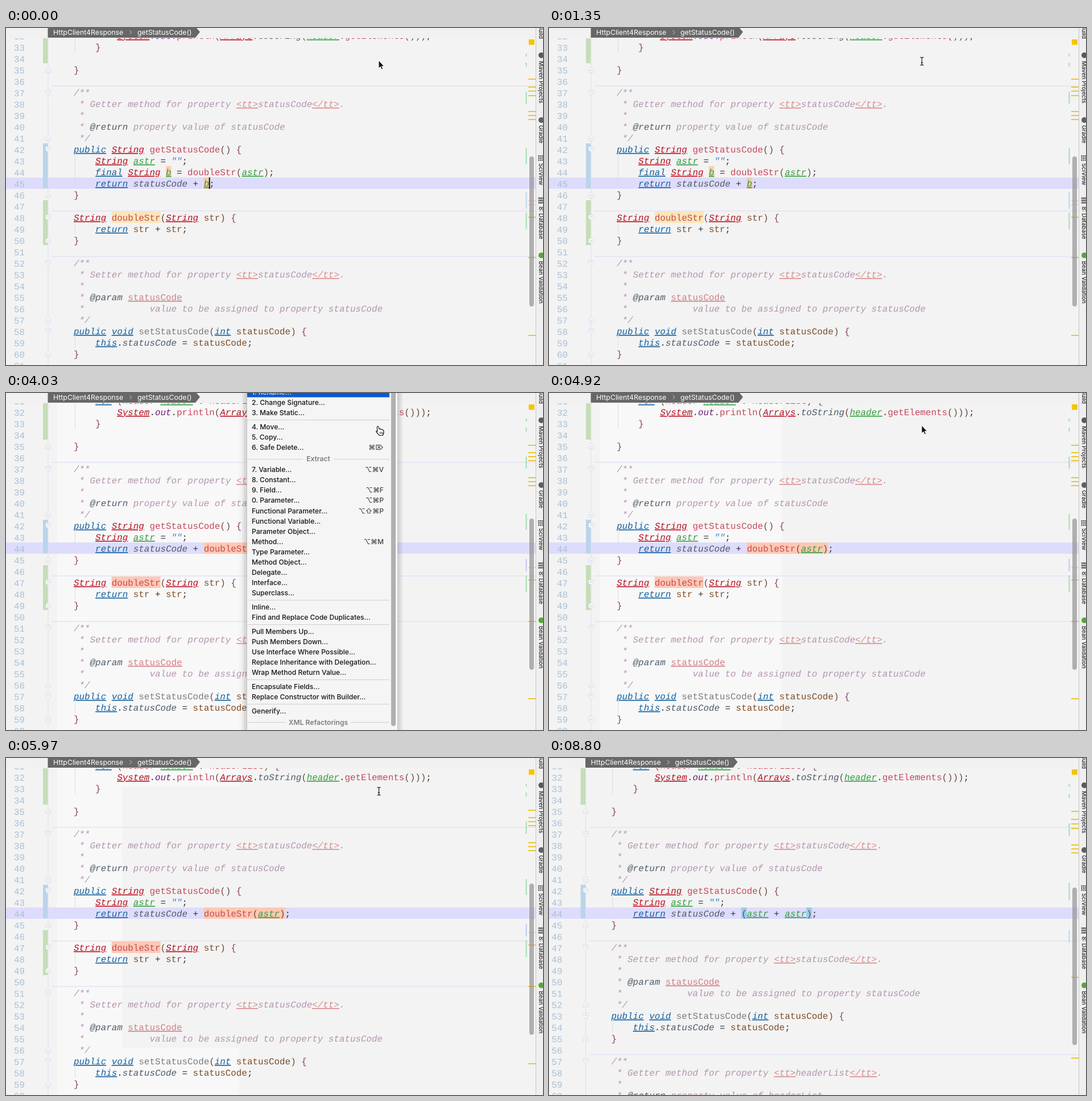
These frames come from a looping animation (944 by 593 pixels, 8.9 s). An HTML page:

```html
<!DOCTYPE html>
<html lang="en">
<head>
<meta charset="utf-8">
<title>Inline refactoring</title>
<style>
html, body { margin: 0; width: 100%; height: 100%; overflow: hidden; background: #f3f3f3; }
svg { display: block; width: 944px; height: 593px; }
text { white-space: pre; font: 500 12.1px Inter, "DejaVu Sans", sans-serif; fill: #151515; }
.code, .num { font: 15.88px "Liberation Mono", "Noto Sans Mono", monospace; text-rendering: geometricPrecision; fill: #333; }
.num { fill: #a9c0d6; }
.k, .t, .v, .tag { font-style: italic; }
.k, .t, .v, .tag, .par { text-decoration: underline 1.3px; text-decoration-skip-ink: none; }
.k { fill: #125f9f; }
.t { fill: #b80f1f; }
.v { fill: #2f9f3e; }
.m { fill: #c4485c; }
.g { fill: #7b7b7b; }
.p { fill: #7c4d28; }
.f { fill: #4e5a68; font-style: italic; }
.o { fill: #6b1d72; font-style: italic; }
.s { fill: #4a82c4; font-style: italic; }
.br { fill: #8a3f5c; }
.pa { fill: #6b4a3c; }
.c { fill: #b294ae; font-style: italic; }
.tag { fill: #d98a8c; }
.par { fill: #d07f86; }
.crumb { font-size: 12.3px; font-weight: 400; fill: #fff; }
.side { font-size: 10.1px; fill: #2a2a2a; }
.head { font-weight: 600; fill: #7c7c7c; text-anchor: middle; }
.mid { text-anchor: middle; }
.end { text-anchor: end; fill: #444; }
.on { fill: #fff; }
</style>
</head>
<body>
<svg id="stage" viewBox="0 0 944 593"></svg>
<script>
const LOOP = 8900, CW = 9.53, X0 = 119, ROW = 20;
const stage = document.getElementById('stage');
const timed = [];

function el(tag, attrs, parent, text) {
  const e = document.createElementNS('http://www.w3.org/2000/svg', tag);
  for (const k in attrs) e.setAttribute(k, attrs[k]);
  if (text !== undefined) e.textContent = text;
  return parent.appendChild(e);
}
const group = (parent, transform = '') => el('g', { transform }, parent);
const rect = (p, x, y, width, height, fill, rx = 0) => el('rect', { x, y, width, height, fill, rx }, p);
const label = (p, x, y, text, cls = '') => el('text', { x, y, class: cls }, p, text);
const path = (p, d, fill, stroke = 'none', w = 1) =>
  el('path', { d, fill, stroke, 'stroke-width': w, 'stroke-linejoin': 'round' }, p);

// Visible only during the given [from, to) spans.
function during(e, ...spans) {
  timed.push({ e, spans });
  return e;
}

// ---------- code ----------
const words = {};
const kinds = {
  k: 'public return final int void this for', t: 'String System Arrays',
  v: 'astr b header', m: 'getStatusCode doubleStr println getElements Header headerList',
  g: 'setStatusCode', p: 'str statusCode', f: 'toString', o: 'out'
};
for (const c in kinds) kinds[c].split(' ').forEach(w => words[w] = c);

function kind(tok, before) {
  if (tok === 'statusCode' && /(this\.|return )$/.test(before)) return 'f';
  if (tok === '""') return 's';
  if (/[{}]/.test(tok)) return 'br';
  if (/[()]/.test(tok)) return 'pa';
  return words[tok] || '';
}
function docKind(tok, before) {
  if (/^</.test(tok)) return 'tag';
  if (/^@/.test(tok)) return 'f';
  return /@param $/.test(before) ? 'par' : 'c';
}
function codeLine(p, y, line) {
  const doc = /^(\/\*| \*)/.test(line);
  const t = el('text', { x: X0, y, class: 'code' }, p);
  const toks = line.match(doc ? /<\/?tt>|@\w+|\w+|\s+|[^\w\s]/g : /""|\w+|\s+|[^\w\s]/g) || [];
  let before = '';
  for (let i = 0; i < toks.length; i++) {
    const tok = toks[i];
    let cls = (doc ? docKind : kind)(tok, before);
    if (cls === 'par' && !/\w/.test(tok)) cls = 'c';
    el('tspan', { class: cls }, t, tok);
    before += tok;
  }
}

const getterDoc = name => ['/**', ` * Getter method for property <tt>${name}</tt>.`, ' *',
  ` * @return property value of ${name}`, ' */'];
const top31 = ['    for (Header header : headerList) {',
  '        System.out.println(Arrays.toString(header.getElements()));', '    }', '', '}', '',
  ...getterDoc('statusCode'), 'public String getStatusCode() {', '    String astr = "";'];
const helper = ['String doubleStr(String str) {', '    return str + str;', '}', ''];
const setter = ['/**', ' * Setter method for property <tt>statusCode</tt>.', ' *',
  ' * @param statusCode', ' *            value to be assigned to property statusCode', ' */',
  'public void setStatusCode(int statusCode) {', '    this.statusCode = statusCode;', '}', ''];

// current: line number of the caret row, which always sits at y 263
function editor(lines, current, bars, marks) {
  const g = group(stage), top = n => 263 + (n - current) * ROW;
  g.top = top;
  rect(g, -20, 263, 980, 20, '#dedcfc');
  rect(g, 73.5, 0, 1, 593, '#dfdff0');
  for (const [a, b, fill] of bars) rect(g, 65, top(a), 8.5, top(b + 1) - top(a) - 1, fill);
  for (const [line, col, len, fill] of marks) rect(g, X0 + col * CW, top(line), len * CW, 20, fill);
  lines.forEach((line, i) => {
    const n = 31 + i, y = top(n);
    if (/^(\/\*|String)/.test(line)) rect(g, 80, y - 1.5, 880, 1, '#dcdaf4');
    if (/^ {4}/.test(line)) rect(g, 121, y, 1, 20, '#dcdce0');
    if (/^(\/\*| \*\/|}|public|String)/.test(line)) fold(g, y + 10.5, /^( \*\/|})/.test(line) ? -1 : 1);
    label(g, 14, y + 16.5, n, 'num');
    codeLine(g, y + 16, line);
  });
  return g;
}
function fold(g, y, s) {
  path(g, `M69.500 ${y - 4.5 * s}h9v${5.5 * s}l-4.500 ${4 * s}l-4.500 ${-4 * s}z`, '#f6f6f6', '#d6dbe8');
  path(g, `M72 ${y - s}h4`, 'none', '#c4cbdc');
}

rect(stage, 0, 0, 944, 593, '#f3f3f3');

// paler area left behind around the menu
const pale = group(stage);
during(path(pale, 'M90 18H410V593H90z', '#f8f8f8'), [3730, 5970]);
during(path(pale, 'M90 18H410V50H204V510H410V593H90z', '#f8f8f8'), [5970, 6270]);

const GREEN = '#c5ddb8', BLUE = '#bad4ea', PEACH = '#ffc8b2', YELLOW = '#fbe6b6';
const viewA = editor(
  [...top31, '    final String b = doubleStr(astr);', '    return statusCode + b;', '}', '', ...helper, ...setter],
  45, [[31, 34, GREEN], [42, 45, BLUE], [47, 50, GREEN]],
  [[44, 17, 1, '#fbd0b0'], [45, 24, 1, '#fbc8a8'], [48, 7, 9, YELLOW]]);
const viewB = editor(
  [...top31, '    return statusCode + doubleStr(astr);', '}', '', ...helper, ...setter, ''],
  44, [[31, 34, GREEN], [42, 44, BLUE], [46, 49, GREEN]],
  [[44, 24, 15, PEACH], [47, 7, 9, YELLOW]]);
const viewC = editor(
  [...top31, '    return statusCode + (astr + astr);', '}', '', ...setter, ...getterDoc('headerList')],
  44, [[31, 34, GREEN], [42, 44, BLUE]], []);
during(viewA, [0, 1500]);
during(viewB, [1500, 6270]);
during(viewC, [6270, LOOP]);
viewC.setAttribute('transform', 'translate(-9.5 0)');

function under(view, line, col, len, fill, ...spans) {
  const r = rect(view, X0 + col * CW, view.top(line), len * CW, 20, fill);
  view.insertBefore(r, view.querySelector('text'));
  during(r, ...spans);
}
under(viewB, 47, 7, 9, PEACH, [3130, 6270]);
under(viewC, 44, 24, 1, '#98cbee', [6750, LOOP]);
under(viewC, 44, 36, 1, '#98cbee', [6750, LOOP]);

const caret = (view, col, ...spans) =>
  during(rect(view, X0 + col * CW - 0.5, 263, 2, 20, '#111'), ...spans);
caret(viewA, 25, [0, 1350]);
[[38, 2550, 2690], [36, 2690, 2830], [34, 2830, 2980], [33, 2980, 3130], [32, 3130, 3730]]
  .forEach(([col, a, b]) => caret(viewB, col, [a, b]));
caret(viewC, 37, [7040, 7620], [8220, 8800]);

// ---------- breadcrumb ----------
rect(stage, 0, 0, 944, 18, '#f1f1f1');
function crumbs(dx, ...spans) {
  const g = during(group(stage, `translate(${dx} 0)`), ...spans);
  path(g, 'M73.500 0H335L341 7L333 17H73.500z', '#676767');
  label(g, 83, 11.5, 'HttpClient4Response', 'crumb');
  path(g, 'M217.500 4l3.500 3.500l-3.500 3.500', 'none', '#d0d0d0');
  label(g, 231, 11.5, 'getStatusCode()', 'crumb');
}
crumbs(0, [0, 6270]);
crumbs(-9.5, [6270, LOOP]);

// ---------- marker stripe ----------
function stripe(thumb, yellow, green, pink, blue, ...spans) {
  const g = during(group(stage), ...spans);
  for (const y of yellow) rect(g, 918, y - 1, 13, 2, '#ecc62e');
  for (const y of pink) rect(g, 918, y - 0.5, 13, 1, '#f6b5a8');
  for (const [a, b] of green) rect(g, 913.5, a, 2, b - a, '#a4dfae');
  rect(g, 913.5, blue[0], 2, blue[1] - blue[0], blue[2]);
  el('rect', { x: 920, y: thumb[0], width: 8, height: thumb[1] - thumb[0], rx: 4, fill: '#999', opacity: 0.75 }, g);
}
const small = [[45, 50], [61, 68]];
stripe([226, 490], [90, 104, 111, 119, 147, 154, 161, 333, 404, 541],
  [...small, [112, 133], [211, 240], [325, 354]], [304, 311], [289, 318, '#bcd8f0'], [0, 1500]);
const yellowB = [92, 105, 112, 119, 149, 156, 163, 329, 402, 538];
const greenB = [...small, [112, 133], [213, 241], [321, 350]];
stripe([221, 487], yellowB, greenB, [307], [292, 314, '#bcd0f4'], [1500, 3130]);
stripe([221, 487], yellowB, greenB, [307, 329], [292, 314, '#c3c6f8'], [3130, 6270]);
stripe([228, 505], [94, 108, 116, 124, 153, 160, 167, 386, 528],
  [[46, 51], [63, 70], [115, 137], [220, 250]], [], [303, 325, '#bcd8f0'], [6270, LOOP]);
during(rect(stage, 919, 20, 10, 9.5, '#f5c400'), [0, 1650], [1950, LOOP]);
during(rect(stage, 919, 20, 10, 9.5, '#b4b4b4'), [1650, 1950]);

// ---------- tool strip ----------
rect(stage, 931, 0, 13, 593, '#efefef');
rect(stage, 931, 0, 1, 593, '#c6c6c6');
[['Build', -5], ['Maven Projects', 58], ['Gradle', 171], ['SciView', 238], ['8: Database', 314], ['Bean Validation', 410]]
  .forEach(([name, y]) => label(group(stage, `translate(936.500 ${y}) rotate(90)`), 0, 0, name, 'side'));
const dot = (cy, fill) => el('circle', { cx: 941, cy, r: 5, fill }, stage);
dot(48, '#5a5a5a');
dot(162, '#5d6062');
dot(400, '#58a53c');
for (let i = 0; i < 3; i++) {
  for (let j = 0; j < 3; j++) rect(stage, 935.5 + j * 3.4, 224 + i * 3.6, 2.4, 2.4, '#555');
  rect(stage, 935.5, 298 + i * 4, 9, 3, '#777', 1);
}

// ---------- refactoring menu ----------
const menu = during(group(stage), [3730, 4920]);
[9, 6, 3].forEach(d => el('rect', { x: 424 - d, y: -20, width: 264 + 2 * d, height: 640, fill: '#000', opacity: 0.05 }, menu));
rect(menu, 423.5, -20, 265, 640, '#c8c8c8');
rect(menu, 424, -20, 264, 640, '#f5f5f5');
during(rect(menu, 424, -10, 250, 17.5, '#0a5ad6'), [3730, 4330]);
during(rect(menu, 424, 367, 250, 18, '#0a5ad6'), [4330, 4920]);

const menuText = `1. Rename...
2. Change Signature...
3. Make Static...
-
4. Move...
5. Copy...
6. Safe Delete...|⌘⌦
#Extract
7. Variable...|⌥⌘V
8. Constant...
9. Field...|⌥⌘F
0. Parameter...|⌥⌘P
Functional Parameter...|⌥⇧⌘P
Functional Variable...
Parameter Object...
Method...|⌥⌘M
Type Parameter...
Method Object...
Delegate...
Interface...
Superclass...
-
Inline...
Find and Replace Code Duplicates...
-
Pull Members Up...
Push Members Down...
Use Interface Where Possible...
Replace Inheritance with Delegation...
Wrap Method Return Value...
-
Encapsulate Fields...
Replace Constructor with Builder...
-
Generify...
#XML Refactorings`;
const picks = { '1. Rename...': [3730, 4330], 'Inline...': [4330, 4920] };
const rule = (x, y, w) => rect(menu, x, Math.round(y), w, 1, '#cfcfcf');
let my = -1.6;
for (const row of menuText.split('\n')) {
  if (row === '-') {
    rule(424, my - 6, 250);
    my += 6.6;
  } else if (row[0] === '#') {
    my += 2;
    const name = row.slice(1), half = name.length * 3.3 + 4;
    rule(424, my, 125 - half);
    rule(549 + half, my, 125 - half);
    label(menu, 549, my + 4.5, name, 'head');
    my += 19;
  } else {
    const [name, keys] = row.split('|');
    label(menu, 432, my + 4.5, name);
    if (keys) label(menu, 664, my + 4.5, keys, 'end');
    if (picks[name]) during(label(menu, 432, my + 4.5, name, 'on'), picks[name]);
    my += 18.1;
  }
}
rect(menu, 677, -10, 8, 596, '#b0b0b0', 4);

// ---------- dialogs ----------
function dialog(x, y, w, h, title, ok, ...spans) {
  const g = during(group(stage), ...spans);
  for (let d = 24; d > 0; d -= 4)
    el('rect', { x: x - d, y: y - d + 8, width: w + 2 * d, height: h + 2 * d, rx: d, fill: '#000', opacity: 0.035 }, g);
  rect(g, x, y, w, h, '#ececec', 5);
  rect(g, x, y, w, 22, '#dadada', 5);
  rect(g, x, y + 21, w, 1, '#b8b8b8');
  label(g, x + w / 2, y + 15.5, title, 'mid');
  [['Cancel', 180, '#fff', ''], [ok, 94, '#3b8cf6', 'on']].forEach(([name, dx, fill, cls]) => {
    rect(g, x + w - dx, y + h - 36, 78, 21, '#c0c0c0', 4);
    rect(g, x + w - dx + 0.5, y + h - 35.5, 77, 20, fill, 4);
    label(g, x + w - dx + 39, y + h - 21, name, 'mid ' + cls);
  });
  return g;
}
const ask = dialog(199, 281, 506, 180, 'Inline Variable', 'Refactor', [150, 1350]);
label(ask, 232, 345, "Inline local variable 'b'? (1 occurrence)");
const opts = dialog(234, 272, 446, 200, 'Inline Method', 'Refactor', [5220, 5970]);
label(opts, 254, 319, 'Method doubleStr(String)');
['Inline all and remove the method', 'Inline all and keep the method', 'Inline this only and keep the method']
  .forEach((name, i) => {
    const y = 346 + i * 25;
    el('circle', { cx: 264, cy: y, r: 7, fill: i ? '#fff' : '#3b8cf6', stroke: '#b0b0b0' }, opts);
    if (!i) el('circle', { cx: 264, cy: y, r: 2.5, fill: '#fff' }, opts);
    label(opts, 278, y + 4.5, name);
  });

// ---------- pointer ----------
const arrow = group(stage), beam = group(stage), hand = group(stage);
path(arrow, 'M0 0V14L3.200 11.200L5.400 16L7.800 15L5.600 10.400H9.800z', '#111', '#fff', 1);
const beamShape = 'M-3 -6.500Q0 -6.500 0 -4.500Q0 -6.500 3 -6.500M0 -5V6M-3 7.500Q0 7.500 0 5.500Q0 7.500 3 7.500M-1.500 3H1.500';
path(beam, beamShape, 'none', '#fff', 3);
path(beam, beamShape, 'none', '#222', 1.3);
path(hand, 'M-1.500 0Q-3 -7 -1 -7.500Q0.500 -7.500 1.500 -2.500Q3 -4 4.300 -2Q6 -3 7 -1Q9 -1.500 9.500 1Q10 4 8 8.500H1.500Q-1 5 -3.500 2.500Q-4.500 0 -1.500 1.500z', '#fff', '#111', 1.2);
path(hand, 'M3 2.500V6M5.200 2.500V6M7.300 2.500V6', 'none', '#111', 0.9);
hand.setAttribute('transform', 'translate(654.500 66)');

function pointer(t) {
  let x = 655.5, y = 58;
  if (t >= 7040) {
    const k = Math.min(1, (Math.floor((t - 7040) / 148.5) + 1) / 8);
    x += 310 * k;
    y += 550 * k;
  }
  const isHand = t >= 4030 && t < 4920;
  const isArrow = t < 1350 || (t >= 4920 && t < 5970) || x > 918;
  hand.style.display = isHand ? '' : 'none';
  arrow.style.display = isArrow ? '' : 'none';
  beam.style.display = isHand || isArrow ? 'none' : '';
  arrow.setAttribute('transform', `translate(${x - 0.5} ${y - 1})`);
  beam.setAttribute('transform', `translate(${x} ${y})`);
}

function draw() {
  const t = performance.now() % LOOP;
  for (const { e, spans } of timed)
    e.style.display = spans.some(([a, b]) => t >= a && t < b) ? '' : 'none';
  pointer(t);
  requestAnimationFrame(draw);
}
draw();
</script>
</body>
</html>
```
